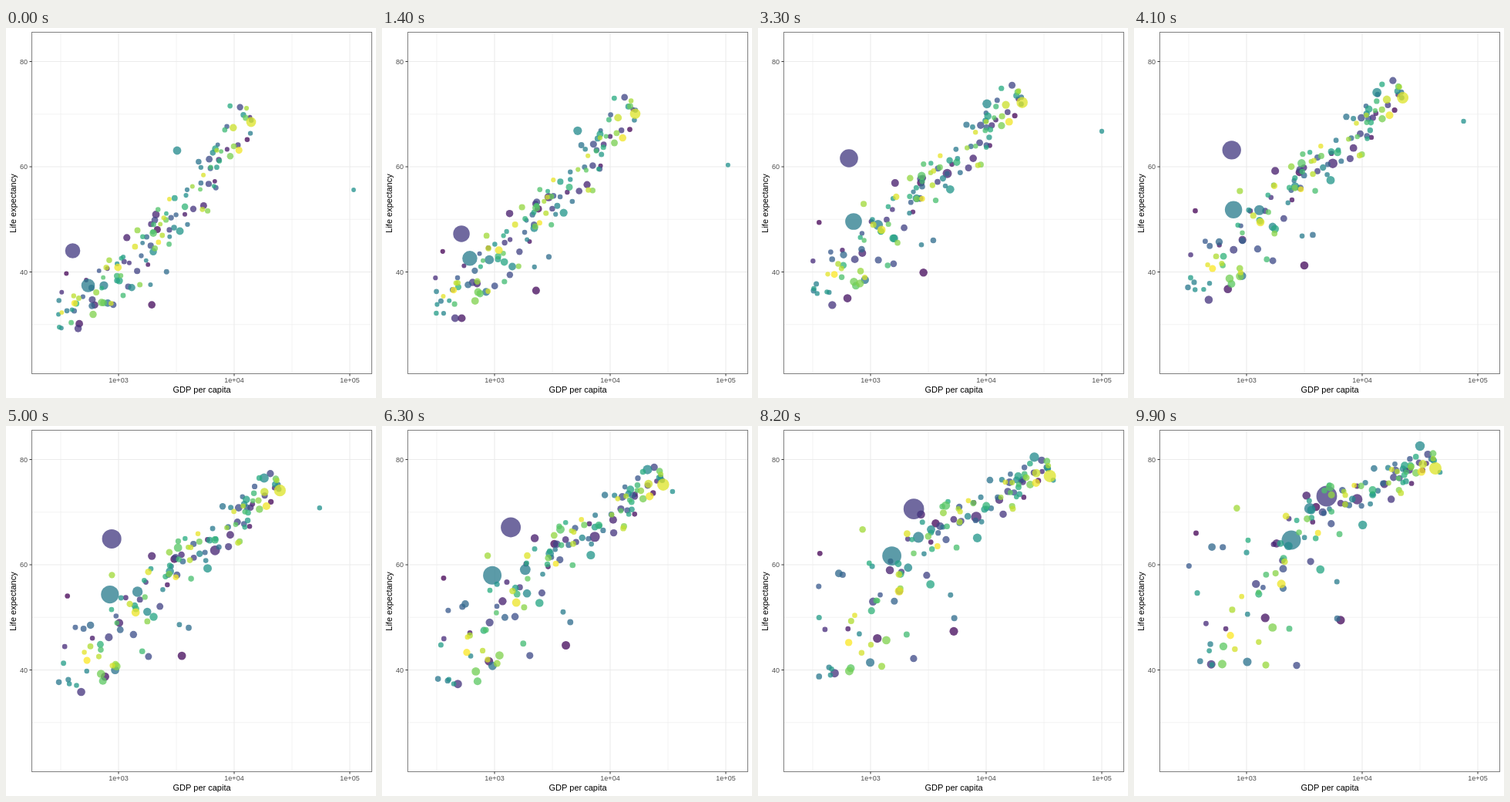
An HTML page with a canvas that plays this animation: 480x480 px, repeating every 10 s.

```html
<!DOCTYPE html>
<html lang="en">
<head>
<meta charset="utf-8">
<title>Life expectancy and GDP per capita</title>
<style>
  html, body { margin: 0; width: 100%; height: 100%; overflow: hidden; background: #fff; }
  canvas { display: block; width: 100vw; height: 100vh; }
</style>
</head>
<body>
<canvas id="stage" width="480" height="480"></canvas>
<script>
const ctx = document.getElementById('stage').getContext('2d');
const FRAMES = 100, STEP = 100, CROWD = 135;
const LEFT = 33.5, TOP = 5.5, RIGHT = 474.5, BOTTOM = 448.5;
const VIRIDIS = ['#440154', '#472d7b', '#3b528b', '#2c728e', '#21918c',
                 '#28ae80', '#5ec962', '#addc30', '#fde725'];

const mix = (a, b, k) => a + (b - a) * k;
const easeOut = s => s * (2 - s);

// Value at share s of an evenly spaced list
function along(list, s) {
  const p = s * (list.length - 1);
  const i = Math.min(Math.floor(p), list.length - 2);
  return mix(list[i], list[i + 1], p - i);
}

function seeded(seed) {
  return () => {
    seed = (seed + 0x6d2b79f5) | 0;
    let n = Math.imul(seed ^ (seed >>> 15), 1 | seed);
    n = (n + Math.imul(n ^ (n >>> 7), 61 | n)) ^ n;
    return ((n ^ (n >>> 14)) >>> 0) / 4294967296;
  };
}

function hueColor(h) {
  const channel = at => Math.round(along(VIRIDIS.map(c => parseInt(c.substr(at, 2), 16)), h));
  return `rgba(${channel(1)},${channel(3)},${channel(5)},0.76)`;
}

// A bubble that follows a few key points
function leader(hue, radius, grow, ...points) {
  const xs = points.map(p => p[0]), ys = points.map(p => p[1]);
  return { hue, radius, grow, at: s => [along(xs, s), along(ys, s)] };
}

// Typical place by rank, from poorest (0) to richest (1)
function placeX(u, s) {
  return 86 + mix(215, 285, s) * u + 30 * s * Math.sin(Math.PI * u) + 18 * (2 * u - 1) ** 3;
}

function placeY(u, s) {
  const k = s * (1.25 - .25 * s);
  return mix(365, 290, k) - mix(245, 230, k) * u
    + mix(32, -65, k) * Math.sin(Math.PI * u) - 25 * (2 * u - 1) ** 3;
}

function makeCrowd() {
  const rnd = seeded(1952);
  const noise = size => (rnd() - rnd()) * size;
  const fold = u => { const v = Math.abs(u); return v > 1 ? 2 - v : v; };
  return Array.from({ length: CROWD }, (_, i) => {
    const rank = (i * .618034 + .3) % 1;
    const loose = 1.25 - rank;
    const dx = noise(.3) * loose, driftX = noise(.2) * loose;
    const dy = noise(.12) * loose, driftY = noise(.25) * loose;
    return {
      hue: (i + .5) / CROWD,
      radius: 2.9 + 2.1 * rnd() ** 2,
      grow: 1.15,
      at: s => [placeX(fold(rank + dx + driftX * s), s),
                placeY(fold(rank + dy + driftY * s), s)]
    };
  });
}

const bubbles = [
  leader(.17, 9.8, 1.37, [86.5, 289], [106, 263], [118, 169], [136, 147], [174, 128], [203, 107], [250, 91]),
  leader(.41, 8.8, 1.42, [106.5, 334], [124, 251], [145, 188], [204, 148]),
  leader(.95, 6.4, 1.25, [318, 122], [355, 84], [391, 55]),
  leader(.47, 5.4, 1.15, [222, 159], [334.5, 68], [371, 26]),
  leader(.42, 5.6, 1.27, [127, 334], [170, 216], [228, 107]),
  leader(.1, 4.9, 1.4, [194.5, 242], [271, 162], [289.5, 95]),
  leader(.5, 2.9, 1.15, [451, 210], [446, 134], [370, 80], [397, 60]),
  ...makeCrowd()
].sort((a, b) => a.hue - b.hue);
for (const b of bubbles) b.color = hueColor(b.hue);

function line(x1, y1, x2, y2, color, width) {
  ctx.strokeStyle = color;
  ctx.lineWidth = width;
  ctx.beginPath();
  ctx.moveTo(x1, y1);
  ctx.lineTo(x2, y2);
  ctx.stroke();
}

function label(text, x, y, size, color, align) {
  ctx.font = `${size}px "Liberation Sans", Arial, sans-serif`;
  ctx.fillStyle = color;
  ctx.textAlign = align;
  ctx.fillText(text, x, y);
}

const colX = power => 146 + 150 * (power - 3);
const rowY = years => 316.5 - 6.825 * (years - 40);

function drawGrid() {
  ctx.fillStyle = '#fff';
  ctx.fillRect(0, 0, 480, 480);
  for (const width of [.6, 1.1]) {
    const shift = width < 1 ? .5 : 0;
    for (let i = 0; i < 3; i++) {
      const x = colX(3 + i - shift), y = rowY(40 + 20 * (i - shift));
      line(x, TOP, x, BOTTOM, '#ebebeb', width);
      line(LEFT, y, RIGHT, y, '#ebebeb', width);
    }
  }
}

function drawAxes() {
  ctx.strokeStyle = '#7f7f7f';
  ctx.lineWidth = 1;
  ctx.strokeRect(LEFT, TOP, RIGHT - LEFT, BOTTOM - TOP);
  for (let i = 0; i < 3; i++) {
    const x = colX(3 + i), years = 40 + 20 * i, y = rowY(years);
    line(x, BOTTOM, x, BOTTOM + 3, '#333', 1);
    label(`1e+0${3 + i}`, x, 460, 9, '#4d4d4d', 'center');
    line(LEFT - 3, y, LEFT, y, '#333', 1);
    label(years, 28, y + 3.3, 9, '#4d4d4d', 'right');
  }
  label('GDP per capita', 254, 473, 11, '#000', 'center');
  ctx.save();
  ctx.translate(13, 227.5);
  ctx.rotate(-Math.PI / 2);
  label('Life expectancy', 0, 0, 11, '#000', 'center');
  ctx.restore();
}

function draw(now) {
  const s = (Math.floor(now / STEP) % FRAMES) / (FRAMES - 1);
  drawGrid();
  for (const b of bubbles) {
    const [x, y] = b.at(s);
    ctx.fillStyle = b.color;
    ctx.beginPath();
    ctx.arc(x, y, b.radius * mix(1, b.grow, easeOut(s)), 0, Math.PI * 2);
    ctx.fill();
  }
  drawAxes();
  requestAnimationFrame(draw);
}

draw(0);
</script>
</body>
</html>
```
